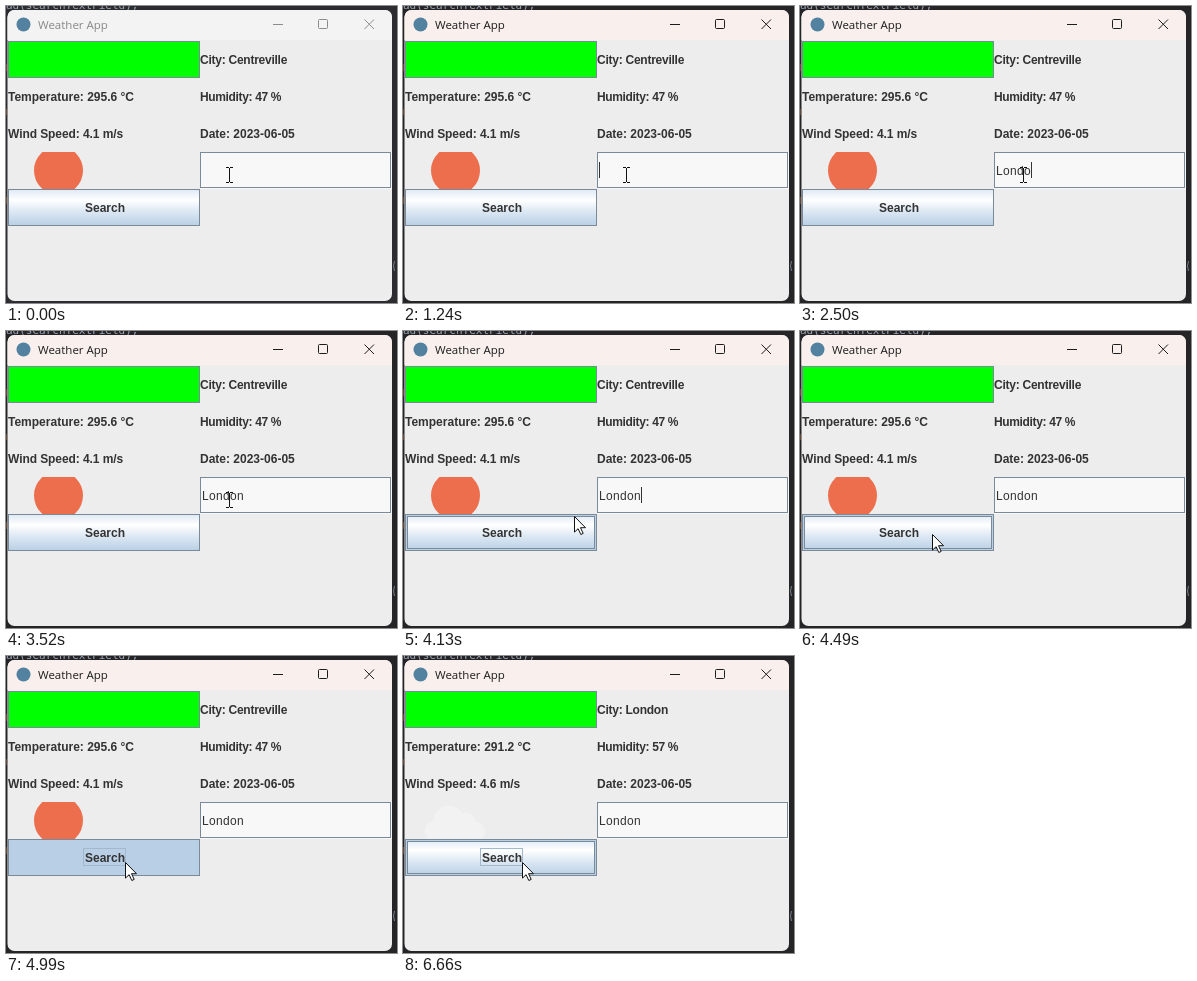
These frames come from a looping animation (391 by 297 pixels, 8000 ms). An HTML page:

```html
<!DOCTYPE html>
<html lang="en">
<head>
<meta charset="utf-8">
<title>Weather App</title>
<style>
html, body { margin: 0; width: 100%; height: 100%; overflow: hidden; background: #2a2a2d; }
svg { display: block; width: 100vw; height: 100vh; }
text { white-space: pre; }
.label { font: bold 12px "Liberation Sans", Arial, sans-serif; fill: #333; }
.title { font: 11.5px "Open Sans", "Noto Sans", sans-serif; }
.input { font: 12px "Liberation Sans", Arial, sans-serif; fill: #333; letter-spacing: .33px; }
.code { font: 11px "DejaVu Sans Mono", monospace; fill: #9aa5b5; }
.tight { letter-spacing: -.25px; }
.tighter { letter-spacing: -.35px; }
.line { fill: none; stroke: #7a8a99; }
.crisp { shape-rendering: crispEdges; }
</style>
</head>
<body>
<svg viewBox="0 0 391 297" preserveAspectRatio="none">
  <defs>
    <linearGradient id="metal" x1="0" y1="0" x2="0" y2="1">
      <stop offset="0" stop-color="#dde8f3"/>
      <stop offset=".3" stop-color="#fff"/>
      <stop offset=".6" stop-color="#dde8f3"/>
      <stop offset="1" stop-color="#b8cfe5"/>
    </linearGradient>
    <clipPath id="iconClip"><rect x="2" y="146" width="192" height="37"/></clipPath>
    <clipPath id="winClip"><rect x="1.5" y="4" width="384.5" height="291" rx="7"/></clipPath>
  </defs>

  <!-- editor behind the window -->
  <rect id="desk" width="391" height="297"/>
  <text class="code" x="0" y="3">ad(searchTextField);</text>
  <path d="M0 58v7M0 103v6M0 191v7" stroke="#a8693c"/>
  <path d="M388.5 255q-2 5 0 10" fill="none" stroke="#77808c"/>

  <!-- window -->
  <g clip-path="url(#winClip)">
    <rect x="1" y="4" width="386" height="292" fill="#ededed"/>
    <rect id="bar" x="1" y="4" width="386" height="30"/>
  </g>
  <circle cx="17.5" cy="18.5" r="7" fill="#5382a1"/>
  <text id="title" class="title" x="32" y="23">Weather App</text>
  <g id="controls" fill="none">
    <path class="crisp" d="M267 18.5h10"/>
    <rect x="312.5" y="13.5" width="9" height="9" rx="1"/>
    <path d="M358.5 13.5l9.5 9.5m0-9.5l-9.5 9.5"/>
  </g>

  <!-- weather panel -->
  <rect class="crisp" x="2.5" y="35.5" width="191" height="36" fill="#0f0" stroke="#7a8a99"/>
  <text id="city" class="label tight" x="194" y="58"></text>
  <text id="temp" class="label" x="2" y="95"></text>
  <text id="humidity" class="label tighter" x="194" y="95"></text>
  <text id="wind" class="label" x="2" y="132" letter-spacing="-.08"></text>
  <text class="label" x="194" y="132">Date: 2023-06-05</text>
  <g clip-path="url(#iconClip)">
    <circle id="sun" cx="52.5" cy="164.5" r="24.5" fill="#ec6e4c"/>
    <path id="cloud" fill="#f2f2f2" d="M32 185a10 10 0 0 1-1-20a15 15 0 0 1 28-8a11 11 0 0 1 14 9a9.6 9.6 0 0 1 1 19z"/>
  </g>

  <!-- text field -->
  <g class="crisp">
    <rect x="194" y="146" width="192" height="37" fill="#f8f8f8"/>
    <rect class="line" x="194.5" y="146.5" width="190" height="35"/>
  </g>
  <text id="input" class="input" x="196" y="169"></text>
  <rect id="caret" class="crisp" y="156" width="1" height="16" fill="#333"/>

  <!-- search button -->
  <g class="crisp">
    <rect id="face" x="2" y="183" width="192" height="37"/>
    <rect class="line" x="2.5" y="183.5" width="191" height="36"/>
    <g id="hover" fill="none">
      <rect x="3.5" y="184.5" width="189" height="34" stroke="#b8cfe5"/>
      <rect class="line" x="4.5" y="185.5" width="187" height="32"/>
    </g>
    <rect id="focus" x="77.5" y="192.5" width="42" height="17" fill="none" stroke="#a3b8cc"/>
  </g>
  <text class="label" x="79" y="206">Search</text>

  <!-- pointers, drawn around their hot spot -->
  <path id="beam" class="crisp" fill="none" stroke="#111" d="M-3-7.5h3m1 0h3M.5-7v14M-3 7.5h3m1 0h3"/>
  <path id="arrow" fill="#fff" stroke="#111" stroke-linejoin="round" d="M.5.5v15.6l3.6-3.4 2.7 5.8 2.4-1.1-2.7-5.7h5z"/>
</svg>
<script>
const LOOP = 8000, ACTIVE = 250, PRESS = 4990, RESULT = 6660;
const WORD = "London", KEYS = [1360, 1480, 1860, 2250, 2500, 3010];
const BLINKS = [250, 740, 1240, 3520, 4010, 4490];
const MOVE = 3890, STEP = 120;
const REST = [223, 169];
const PATH = [[217, 171], [195, 178], [171, 185], [155, 191], [142, 197], [132, 203], [124, 206], [119, 206]];

const $ = id => document.getElementById(id);
const set = (id, name, value) => $(id).setAttribute(name, value);
const show = (id, on) => set(id, "visibility", on ? "visible" : "hidden");
const write = (id, text) => { if ($(id).textContent !== text) $(id).textContent = text; };
const passed = (times, t) => times.filter(x => x <= t).length;

function pointer(t) {
  if (t < MOVE) return REST;
  return PATH[Math.min(PATH.length - 1, Math.floor((t - MOVE) / STEP))];
}

function draw(t) {
  const active = t >= ACTIVE, done = t >= RESULT;
  const pressed = t >= PRESS && !done;

  set("desk", "fill", active ? "#252528" : "#2d2d31");
  set("bar", "fill", active ? "#f9f0ee" : "#f3f3f3");
  set("title", "fill", active ? "#1c1c1c" : "#888");
  set("controls", "stroke", active ? "#1c1c1c" : "#8c8c8c");

  write("city", "City: " + (done ? "London" : "Centreville"));
  write("temp", `Temperature: ${done ? "291.2" : "295.6"} °C`);
  write("humidity", `Humidity: ${done ? 57 : 47} %`);
  write("wind", `Wind Speed: ${done ? "4.6" : "4.1"} m/s`);
  show("sun", !done);
  show("cloud", done);

  const typed = passed(KEYS, t);
  write("input", WORD.slice(0, typed));
  set("caret", "x", 196 + 7 * typed);
  show("caret", passed(BLINKS, t) % 2 === 1);

  const [x, y] = pointer(t);
  const inField = x >= 194 && y < 183;
  show("beam", inField);
  show("arrow", !inField);
  set("beam", "transform", `translate(${x} ${y})`);
  set("arrow", "transform", `translate(${x} ${y})`);

  set("face", "fill", pressed ? "#b8cfe5" : "url(#metal)");
  show("hover", x < 194 && y >= 183 && !pressed);
  show("focus", t >= PRESS);
}

const start = performance.now();
function tick() {
  draw((performance.now() - start) % LOOP);
  requestAnimationFrame(tick);
}
tick();
</script>
</body>
</html>
```
